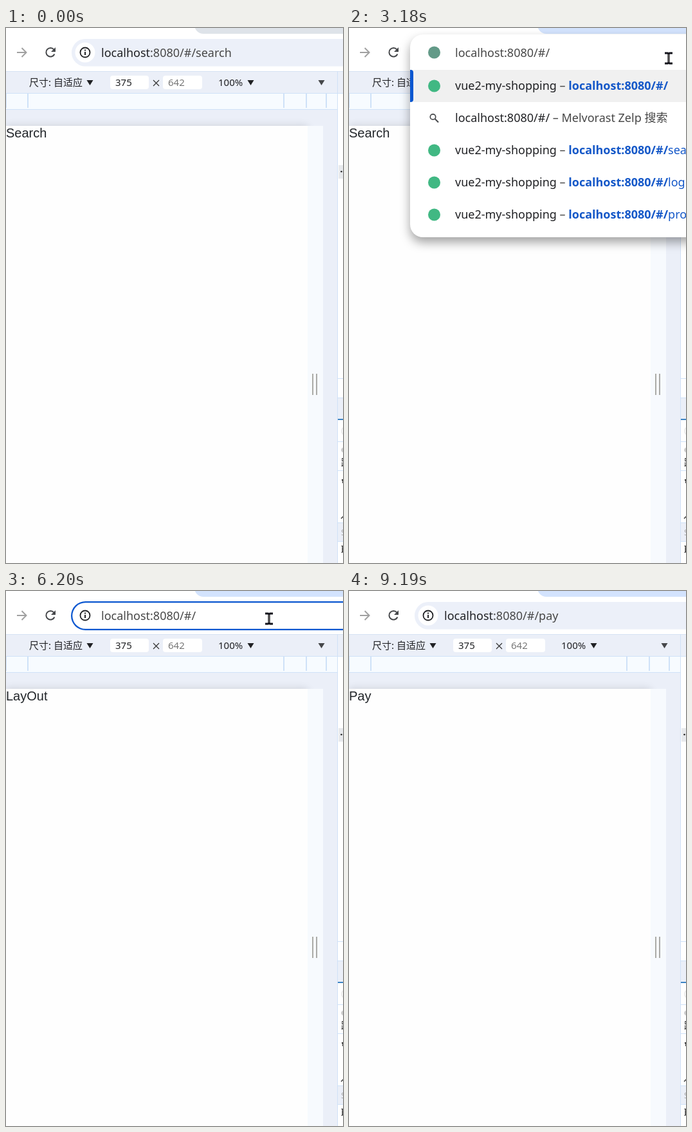
Recreate the animation shown at these times as an HTML page with a canvas. Size 524 px wide and 831 px high, loop 9390 ms.

```html
<!DOCTYPE html>
<html lang="zh">
<head>
<meta charset="utf-8">
<style>
  html, body { margin: 0; width: 100%; height: 100%; overflow: hidden; background: #fff; }
  canvas { display: block; }
</style>
</head>
<body>
<canvas id="stage" width="524" height="831"></canvas>
<script>
const ctx = document.getElementById('stage').getContext('2d');
const LOOP = 9390;
const SANS = '"Noto Sans", "Noto Sans CJK SC", sans-serif';
const URL_FONT = '18px ' + SANS;
const BOLD_FONT = 'bold 18px ' + SANS;
const SMALL_FONT = '15px ' + SANS;
const BASE = 'localhost:8080/#/';
const BLUE = '#0b57d0', LINK = '#1558c8', PALE = '#ebeff8', RULE = '#cfe2f8', INK = '#202124', GREY = '#474747';

// Pointer path: time, x, y
const PATH = [
  [60, 536, 735], [300, 480, 400], [410, 452, 292], [520, 422, 192], [710, 352, 38],
  [890, 352, 38], [1470, 296, 40], [1790, 296, 40], [2050, 497, 47],
  [3940, 497, 47], [4150, 409, 43], [8420, 409, 43],
  [8640, 417, 190], [8930, 440, 548], [9190, 460, 850]
];

function pointerAt(t) {
  const next = PATH.findIndex(p => p[0] > t);
  if (next < 1) return null;
  const [t0, x0, y0] = PATH[next - 1], [t1, x1, y1] = PATH[next];
  const k = (t - t0) / (t1 - t0);
  return { x: x0 + (x1 - x0) * k, y: y0 + (y1 - y0) * k };
}

function rect(x, y, w, h, color) {
  ctx.fillStyle = color;
  ctx.fillRect(x, y, w, h);
}

function rounded(x, y, w, h, r, color) {
  ctx.beginPath();
  ctx.roundRect(x, y, w, h, r);
  ctx.fillStyle = color;
  ctx.fill();
}

function disc(x, y, r, color) {
  ctx.beginPath();
  ctx.arc(x, y, r, 0, 7);
  ctx.fillStyle = color;
  ctx.fill();
}

function ring(x, y, r, color, width) {
  ctx.beginPath();
  ctx.arc(x, y, r, 0, 7);
  ctx.strokeStyle = color;
  ctx.lineWidth = width;
  ctx.stroke();
}

function line(d, color, width) {
  ctx.strokeStyle = color;
  ctx.lineWidth = width;
  ctx.stroke(new Path2D(d));
}

function shape(d, color) {
  ctx.fillStyle = color;
  ctx.fill(new Path2D(d));
}

function withShadow(color, blur, offsetY, paint) {
  ctx.save();
  ctx.shadowColor = color;
  ctx.shadowBlur = blur;
  ctx.shadowOffsetY = offsetY;
  paint();
  ctx.restore();
}

function widthOf(text, font) {
  ctx.font = font;
  return ctx.measureText(text).width;
}

// Draws text and returns the x where it ends
function text(str, x, y, font, color) {
  ctx.font = font;
  ctx.fillStyle = color;
  ctx.fillText(str, x, y);
  return x + ctx.measureText(str).width;
}

function runs(x, y, ...parts) {
  for (const [str, color, font = URL_FONT] of parts) x = text(str, x, y, font, color);
}

function triangle(x, color) {
  shape(`M${x - 5} 81h10l-5 8z`, color);
}

function drawNavigation() {
  line('M17 38h14M24.5 31l7 7l-7 7', '#a0a0a0', 2);
  line('M75.4 40.5A6.8 6.8 0 1 1 74.5 33.5', '#45474a', 2);
  shape('M77 30v7h-7z', '#45474a');
}

function drawDevtools() {
  rect(0, 67, 524, 764, PALE);
  rect(0, 67, 524, 1, '#d6e2f3');
  rect(0, 101, 516, 26, RULE);
  rect(0, 102, 516, 24, '#f7fbff');
  for (const x of [-1, 33, 431, 466, 497]) rect(x, 102, 2, 22, RULE);

  text('尺寸: 自适应', 36, 90, SMALL_FONT, INK);
  triangle(130.5, INK);
  rounded(162, 74, 60, 21, 4, '#fff');
  text('375', 170, 90, SMALL_FONT, INK);
  line('M229 81l9 9M238 81l-9 9', '#333', 1.2);
  rounded(244, 74, 61, 21, 4, '#fff');
  text('642', 252, 90, SMALL_FONT, '#777');
  text('100%', 330, 90, SMALL_FONT, INK);
  triangle(380.5, INK);
  triangle(490.5, '#45474a');

  withShadow('rgba(0,0,0,.14)', 12, 0, () => rect(0, 152, 469, 679, '#fefefe'));
  rect(469, 152, 24, 679, '#f7fafe');
  rect(476, 537, 2, 33, '#ababa8');
  rect(482, 537, 2, 33, '#ababa8');
}

function drawSidePanel() {
  rect(516, 102, 8, 729, '#fff');
  rect(517, 213, 7, 21, '#e8eaed');
  disc(521.5, 223, 1.3, '#222');
  rect(516, 575, 8, 33, PALE);
  rect(516, 769, 8, 29, PALE);
  for (const y of [101, 544, 574, 642, 687, 768, 797]) rect(516, y, 8, 1, RULE);
  rect(516, 607, 8, 2, '#3d84c4');
  ring(530, 626, 8, '#ddd', 1);
  text('e', 521, 659, '12px ' + SANS, '#aaa');
  text('路', 521, 680, SMALL_FONT, '#222');
  rect(522, 701, 2, 2, '#333');
  rect(523, 703, 1, 4, '#333');
  line('M521 762l4-4', '#333', 1.3);
  text('S', 521, 788, '12px ' + SANS, '#aaa');
  text('b', 521, 815, '14px "Noto Serif", serif', '#222');
  rect(515, 67, 1, 764, '#d0e1f6');
}

function drawInfoIcon() {
  ring(123, 38, 7.5, INK, 1.8);
  rect(122, 37, 2, 5, INK);
  rect(122, 33.5, 2, 2, INK);
}

function drawCaret(x) {
  rect(Math.round(x), 26, 1, 22, '#222');
}

function drawAddressBar(url, focused, hovered, selectFrom, caret) {
  if (focused) {
    rounded(101, 16, 500, 45, 22.5, BLUE);
    rounded(103.3, 18.3, 495, 40.4, 20.2, '#fff');
  } else {
    rounded(102, 17, 500, 42.5, 21, hovered ? '#dfe3e9' : '#ecf0f9');
    disc(123, 38, 15.5, '#fff');
  }
  drawInfoIcon();
  runs(148, 45, [url.slice(0, 9), focused ? GREY : INK], [url.slice(9), GREY]);
  const end = 148 + widthOf(url, URL_FONT);
  if (selectFrom < url.length) {
    const x = 148 + widthOf(url.slice(0, selectFrom), URL_FONT);
    rect(x, 26, end - x, 25, BLUE);
    text(url.slice(selectFrom), x, 45, URL_FONT, '#fff');
  }
  if (caret) drawCaret(end);
}

const icons = {
  site: y => disc(132.5, y, 9.5, '#41b883'),
  dimSite: y => disc(132.5, y, 9.5, '#639a88'),
  globe(y) {
    disc(132, y, 8.5, '#45474a');
    shape(`M125.5 ${y - 1}l5 5v3q-5-2-5-8zM134 ${y - 6.5}q5 2 4.5 8l-2 3l-2-3h-5v-3h3v-2.5h1.5z`, '#fff');
  },
  search(y) {
    ring(130.5, y - 2, 4.2, '#45474a', 1.7);
    line(`M133.5 ${y + 1}l5.5 5.5`, '#45474a', 1.9);
  }
};

function drawSuggestions(typed, caret) {
  const url = BASE + typed;
  const pageRow = rest => ['site', ['vue2-my-shopping', INK], [' – ', GREY], [url, LINK, BOLD_FONT], [rest, LINK]];
  const rows = [
    typed ? ['globe', [url, LINK, BOLD_FONT]] : pageRow(''),
    ['search', [url, INK], [' – Melvorast Zelp 搜索', GREY]]
  ];
  if (!typed) rows.push(pageRow('search'), pageRow('login'), pageRow('prodetail'));
  if (typed === 'p') rows.push(pageRow('rodetail'));

  withShadow('rgba(0,0,0,.36)', 16, 8, () => rounded(95, 10, 480, 65 + rows.length * 50, 20, '#fff'));

  icons[typed ? 'globe' : 'dimSite'](38);
  const end = text(url, 165, 45, URL_FONT, GREY);
  if (caret) drawCaret(end);

  rect(95, 65, 429, 50, '#f0f0f0');
  rounded(95, 65, 5, 50, [0, 4, 4, 0], BLUE);
  rows.forEach(([icon, ...parts], i) => {
    const y = 90 + i * 50;
    icons[icon](y);
    runs(165, y + 6, ...parts);
  });
}

function drawPointer({ x, y }, inBar, pressed) {
  ctx.save();
  ctx.translate(x, y);
  if (inBar) {
    line('M-6-8h4.5l1.5 1l1.5-1h4.5M0-7v14M-6 8h4.5l1.5-1l1.5 1h4.5', '#14141c', 3.2);
    line('M0-6v12', '#8d8880', 1);
  } else {
    const arrow = 'M0 0v17l4-4l3 7l3-1.3l-3-6.7h5.5z';
    shape(arrow, '#fff');
    line(arrow, '#111', 1.2);
  }
  if (pressed) disc(0, 0, 15, 'rgba(243,236,50,.65)');
  ctx.restore();
}

const between = (t, a, b) => t >= a && t < b;

function draw(t) {
  const pointer = pointerAt(t);
  const inBar = pointer && between(pointer.y, 17, 61);
  const focused = between(t, 890, 3250) || between(t, 4330, 7910);
  const pressed = between(t, 890, 1860) || between(t, 4330, 4460);
  const path = t < 2680 ? 'search' : t < 7210 ? '' : t < 7350 ? 'p' : t < 7530 ? 'pa' : 'pay';
  const page = t < 3310 ? 'Search' : t < 7980 ? 'LayOut' : 'Pay';
  const url = BASE + path;

  let selectFrom = url.length;
  if (between(t, 890, 2680)) selectFrom -= Math.round(6 * Math.min(1, (t - 890) / 580) ** 2);
  if (between(t, 4330, 5640)) selectFrom = 0;
  const caret = between(t, 2680, 3180) || between(t, 5640, 6200) || between(t, 6710, 7910);

  rect(0, 0, 524, 831, '#fff');
  rounded(293, -20, 300, 29, 14, t < 890 ? '#dee3e9' : '#d3e3fd');
  drawNavigation();
  drawDevtools();
  drawSidePanel();
  text(page, 0, 170, '20px "Liberation Sans", Arial, sans-serif', '#212529');

  if (between(t, 2680, 3250) || between(t, 7210, 7910)) drawSuggestions(path, caret);
  else drawAddressBar(url, focused, inBar, selectFrom, caret);
  if (pointer) drawPointer(pointer, inBar, pressed);
}

const start = performance.now();
function frame() {
  draw((performance.now() - start) % LOOP);
  requestAnimationFrame(frame);
}
frame();
</script>
</body>
</html>
```
